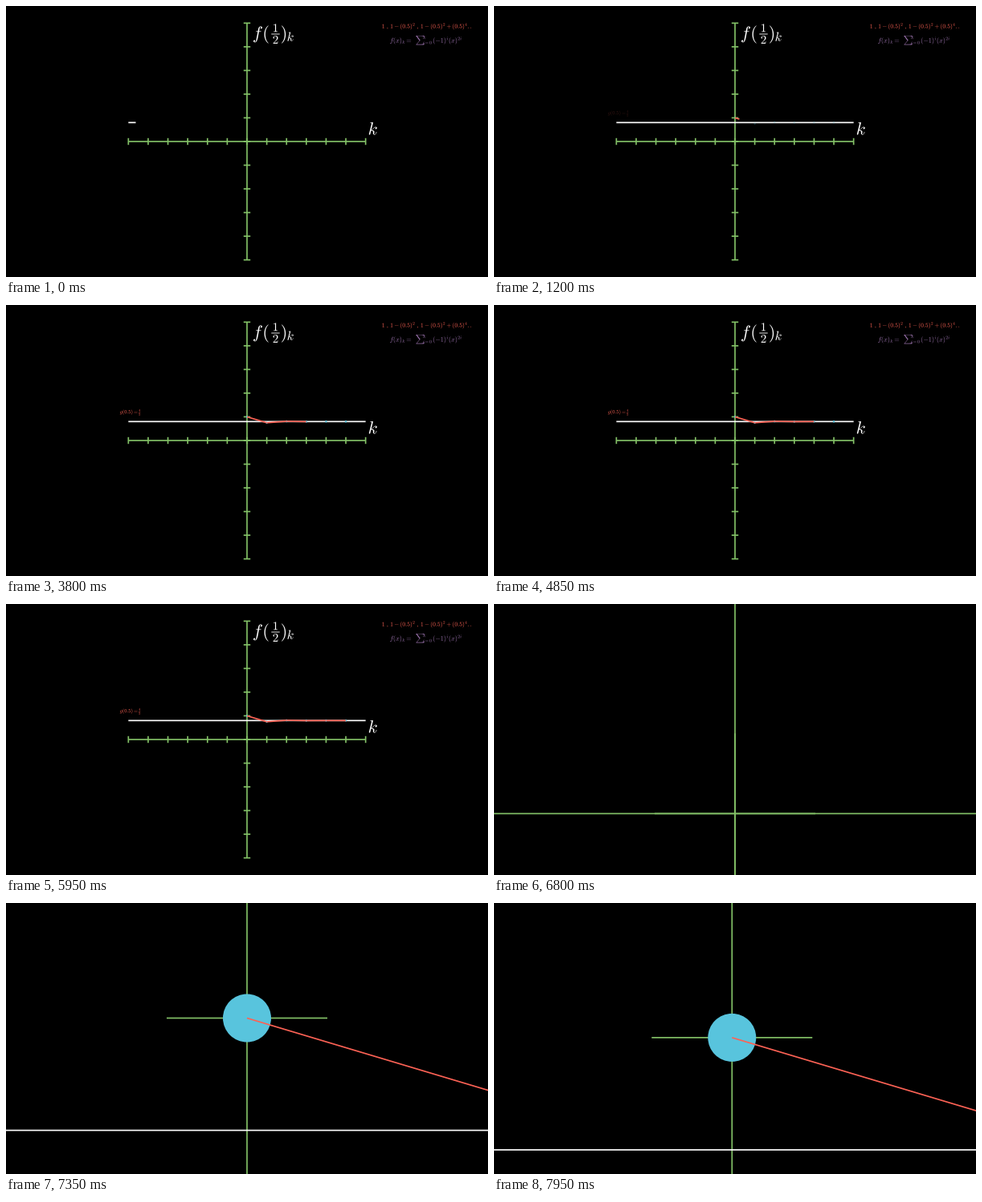
Animation, 600 px wide and 338 px high, one loop 8000 ms. Source, as a matplotlib script:

```python
import numpy as np
import matplotlib.pyplot as plt
from matplotlib.animation import FuncAnimation
from matplotlib.collections import LineCollection
from matplotlib.patches import Circle, PathPatch
from matplotlib.textpath import TextPath
from matplotlib.transforms import Affine2D

plt.rcParams["mathtext.fontset"] = "cm"
plt.rcParams["path.snap"] = False

W, H, DPI = 600, 338, 64
FRAMES, STEP = 160, 50
UNIT = W * 9 / 128            # pixels per scene unit in the wide view
UNIT = W / (128 / 9)
ZOOMED = 1000                 # pixels per scene unit in the close view
KX, KY = 7 / 12, 7 / 10       # scene units per axis step
STROKE = 1.69 * 72 / DPI
GREEN, RED, BLUE, PURPLE = "#83C167", "#FC6255", "#58C4DD", "#9A72AC"

fig = plt.figure(figsize=(W / DPI, H / DPI), dpi=DPI, facecolor="black")
ax = fig.add_axes([0, 0, 1, 1])
ax.axis("off")


def smooth(a):
    """Sigmoid easing from 0 to 1."""
    a = np.clip(a, 0, 1)
    sig = lambda v: 1 / (1 + np.exp(-v))
    low = sig(-5)
    return float(np.clip((sig(10 * (a - 0.5)) - low) / (1 - 2 * low), 0, 1))


def ease(t, start, length=1000):
    return smooth((t - start) / length)


def tex(source, x, baseline, em, color, anchor=0.0):
    """Math text with its ink anchored at pixel x (0 left, 0.5 centre)."""
    path = TextPath((0, 0), f"${source}$", size=em)
    ink = path.get_extents()
    left = x - ink.x0 - anchor * ink.width
    place = Affine2D().translate(left - W / 2, H / 2 - baseline).scale(1 / UNIT)
    return ax.add_patch(PathPatch(place.transform_path(path), fc=color, lw=0, zorder=5))


def stroke(color, zorder):
    return ax.plot([], [], color=color, lw=STROKE, solid_capstyle="butt", zorder=zorder)[0]


def draw_to(line, start, end, part):
    tip = start + (end - start) * part
    line.set_data([start[0], tip[0]], [start[1], tip[1]])
    line.set_visible(part > 0)


# Axes with ticks
half, tick = 3.5, 0.1
bars = [[(-half, 0), (half, 0)], [(0, -half), (0, half)]]
bars += [[(i * KX, -tick), (i * KX, tick)] for i in range(-6, 7)]
bars += [[(-tick, i * KY), (tick, i * KY)] for i in range(-5, 6)]
ax.add_collection(LineCollection(bars, colors=GREEN, linewidths=STROKE,
                                 capstyle="butt", zorder=1), autolim=False)

# Axis labels
tex("k", 451.8, 160.5, 22, "white")
tex("f", 308, 41, 22, "white")
tex("(", 321.5, 41, 22, "white")
tex("1", 335.5, 32.3, 15, "white", 0.5)
tex("2", 335.5, 47, 15, "white", 0.5)
tex(")", 343, 41, 22, "white")
tex("k", 350.5, 43.8, 16, "white")
bar_y = (H / 2 - 35) / UNIT
ax.plot([(330.3 - W / 2) / UNIT, (340.7 - W / 2) / UNIT], [bar_y, bar_y],
        color="white", lw=0.9 * 72 / DPI, solid_capstyle="butt", zorder=5)

# Series and its formula
tex(r"1\ ,\,1-(0.5)^2\ ,\,1-(0.5)^2+(0.5)^4..", 523.8, 27.6, 7.5, RED, 0.5)
tex("f(x)_k=", 478.3, 45.5, 8.2, PURPLE)
tex(r"\sum", 510.3, 45.5, 8.2, PURPLE)
tex("k", 519.5, 41.2, 6, PURPLE)
tex("i=0", 519, 47.6, 5.6, PURPLE)
tex("(-1)^i(x)^{2i}", 532, 45.5, 8.2, PURPLE)

limit_label = tex(r"g(0.5)=\frac{4}{5}", 141.8, 135.3, 6.4, RED)

# Limit line, partial sums and the path through them
limit = stroke("white", 2)
limit_ends = np.array([[-half, 0.8 * KY], [half, 0.8 * KY]])
sums = np.cumsum((-0.25) ** np.arange(6))
points = np.column_stack([np.arange(6) * KX, sums * KY])
dots = [ax.add_patch(Circle(p, 0.03, fc=BLUE, lw=0, zorder=3)) for p in points]
segments = [stroke(RED, 4) for _ in points[1:]]

DRAW, CUT, PAN, FOLLOW = 825, 6350, 6482, 7883


def camera(t):
    """Centre of the view and its pixels per scene unit."""
    if t < CUT:
        return np.zeros(2), UNIT
    if t < FOLLOW:
        return np.array([0, 0.687 * ease(t, PAN)]), ZOOMED
    return points[0] + (points[1] - points[0]) * ease(t, FOLLOW), ZOOMED


def update(frame):
    t = frame * STEP
    draw_to(limit, *limit_ends, ease(t, DRAW - 1000))
    shown = ease(t, DRAW)
    limit_label.set_alpha(shown)
    for dot in dots:
        dot.set_alpha(shown)
    for i, line in enumerate(segments):
        draw_to(line, points[i], points[i + 1], ease(t, DRAW + 1000 * i))
    (cx, cy), scale = camera(t)
    ax.set_xlim(cx - W / 2 / scale, cx + W / 2 / scale)
    ax.set_ylim(cy - H / 2 / scale, cy + H / 2 / scale)
    return []


anim = FuncAnimation(fig, update, frames=FRAMES, init_func=lambda: update(0),
                     interval=STEP, repeat=True, repeat_delay=0, blit=False)
plt.show()
```
